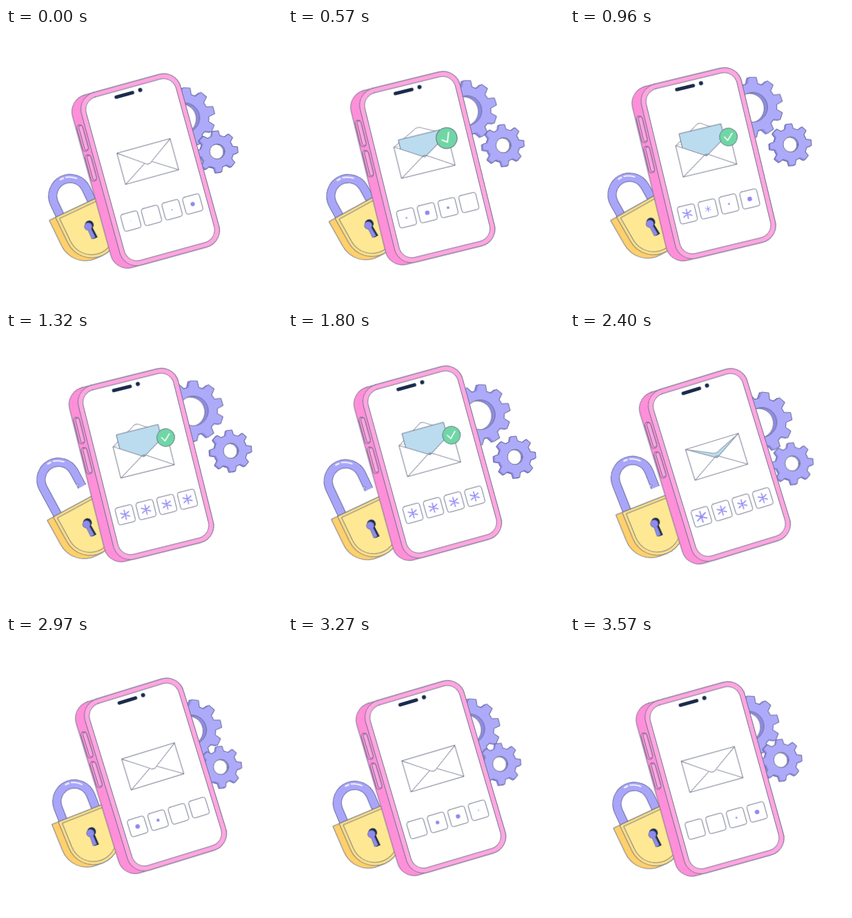
An HTML page without scripts that plays this animation: 400 by 400 pixels, repeating every 3.6 s.

```html
<!DOCTYPE html>
<html lang="en">
<head>
<meta charset="utf-8">
<title>Secure mail</title>
<style>
html, body { margin: 0; width: 100%; height: 100%; overflow: hidden; background: #fff; }
svg { display: block; width: 100vw; height: 100vh; }
.line { stroke: #666d84; stroke-width: .9; stroke-linejoin: round; stroke-linecap: round; }
.loop { animation: 3600ms linear infinite; }

/* Every object drifts on a small circle; some also sway */
.orbit { animation-name: orbit; }
.sway { animation: sway 1800ms cubic-bezier(.37, 0, .63, 1) -900ms infinite alternate; }
@keyframes orbit {
  from { transform: rotate(var(--a)) translateX(var(--r)) rotate(calc(-1 * var(--a))); }
  to { transform: rotate(calc(var(--a) + 360deg)) translateX(var(--r)) rotate(calc(-360deg - var(--a))); }
}
@keyframes sway {
  from { transform: rotate(calc(-1 * var(--s))); }
  to { transform: rotate(var(--s)); }
}

.kick, .shackle, .mail, .letter, .check, .tick, .dot, .star { animation-timing-function: ease-in-out; }
.kick { animation-name: kick; }
@keyframes kick {
  0%, 30.5%, 50%, 76%, 100% { transform: translateY(0); }
  36.5% { transform: translateY(-3px); }
  67% { transform: translateY(-4.5px); }
}
.shackle { animation-name: unlock; }
@keyframes unlock {
  0%, 30.5%, 75%, 100% { transform: translateY(0); }
  35.5% { transform: translateY(-25px); }
  50%, 68.5% { transform: translateY(-22px); }
}

.mail { animation-name: hop; }
@keyframes hop {
  0%, 6%, 28%, 100% { transform: translateY(0); }
  15.8% { transform: translateY(-4px); }
}
.flap-front { animation-name: flap-front; }
@keyframes flap-front {
  0%, 1.7% { transform: scaleY(1); }
  6.1%, 63.9% { transform: scaleY(0); }
  68.2%, 100% { transform: scaleY(1); }
}
.flap-back { animation-name: flap-back; }
@keyframes flap-back {
  0%, 6.1%, 63.9%, 100% { transform: scaleY(0); }
  18%, 59% { transform: scaleY(-.88); }
}
.letter { animation-name: letter; }
@keyframes letter {
  0%, 8.5%, 63.5%, 100% { transform: translateY(0); }
  22%, 54% { transform: translateY(-17px); }
}
.check { animation-name: check; }
@keyframes check {
  0%, 9.5%, 62%, 100% { transform: scale(0); }
  15.8% { transform: scale(1.17); }
  21%, 56% { transform: scale(1); }
}
.tick { animation-name: tick; }
@keyframes tick {
  0%, 9.5% { transform: rotate(-45deg); }
  15.8% { transform: rotate(-25deg); }
  21%, 100% { transform: rotate(0); }
}

.dot { animation-name: pulse; animation-delay: calc(-3600ms + var(--i) * 200ms); }
@keyframes pulse {
  0% { transform: scale(.15); }
  9.4% { transform: scale(1); }
  20.6%, 70% { transform: scale(0); }
  81.5% { transform: scale(1); }
  93.3%, 98.3% { transform: scale(0); }
  100% { transform: scale(.15); }
}
.star { animation-name: star; animation-delay: calc(-3600ms + var(--i) * 90ms); }
@keyframes star {
  0%, 21.7%, 71.1%, 100% { transform: scale(0); }
  26.1%, 64.5% { transform: scale(1); }
  67% { transform: scale(1.18); }
}
</style>
</head>
<body>
<svg viewBox="0 0 400 400" fill="none">
  <defs>
    <path id="big-bar" d="M-5-43H5L7-34V34L5 43H-5L-7 34V-34Z"/>
    <g id="big">
      <circle r="34.5"/>
      <use href="#big-bar"/>
      <use href="#big-bar" transform="rotate(36)"/>
      <use href="#big-bar" transform="rotate(72)"/>
      <use href="#big-bar" transform="rotate(108)"/>
      <use href="#big-bar" transform="rotate(144)"/>
    </g>
    <path id="small-bar" d="M-3.8-29.5H3.8L5.4-22V22L3.8 29.5H-3.8L-5.4 22V-22Z"/>
    <g id="small">
      <circle r="23"/>
      <use href="#small-bar"/>
      <use href="#small-bar" transform="rotate(45)"/>
      <use href="#small-bar" transform="rotate(90)"/>
      <use href="#small-bar" transform="rotate(135)"/>
    </g>
    <clipPath id="big-hole"><circle r="21.5"/></clipPath>
    <clipPath id="small-hole"><circle r="11"/></clipPath>

    <path id="arch" d="M-31.3 0V-50A25.3 25.3 0 0 1 19.3-50V-25"/>
    <path id="key" d="M-2.7 3L-3.2 18.5H3.2L2.7 3A6.3 6.3 0 1 0-2.7 3Z"/>
    <path id="flap" d="M-39.8 0L-6.5 23.5Q0 30.5 6.5 23.5L39.8 0Z"/>
    <rect id="box" x="-12.7" y="-12.7" width="25.4" height="25.4" rx="3.5" class="line"/>
    <circle id="bead" r="3.3" fill="#8f89f2"/>
    <path id="asterisk" d="M0-7V7M-6-3.5L6 3.5M6-3.5L-6 3.5" stroke="#8f89f2" stroke-width="1.5" stroke-linecap="round"/>
  </defs>

  <!-- gears -->
  <g transform="translate(269 125)">
    <g class="loop orbit" style="--a:152deg;--r:11px">
      <g class="sway" style="--s:-3.5deg">
        <g transform="rotate(3)">
          <g fill="#8f8be6" stroke="#4a4f80" stroke-width="1.6" stroke-linejoin="round">
            <use href="#big" x="-3" y="1"/><use href="#big"/>
          </g>
          <use href="#big" x="-3" y="1" fill="#8f8be6"/>
          <use href="#big" fill="#aeaafa"/>
        </g>
      </g>
      <circle r="21.5" fill="#8f8be6"/>
      <g clip-path="url(#big-hole)"><circle cx="-5" cy="1.5" r="21.5" fill="#fff" class="line"/></g>
      <circle r="21.5" class="line"/>
    </g>
  </g>
  <g transform="translate(317.7 180)">
    <g class="loop orbit" style="--a:185deg;--r:11.5px">
      <g transform="rotate(-5)">
        <g fill="#8f8be6" stroke="#4a4f80" stroke-width="1.6" stroke-linejoin="round">
          <use href="#small" x="-2" y="1"/><use href="#small"/>
        </g>
        <use href="#small" x="-2" y="1" fill="#8f8be6"/>
        <use href="#small" fill="#aeaafa"/>
      </g>
      <circle r="11" fill="#8f8be6"/>
      <g clip-path="url(#small-hole)"><circle cx="-2" cy=".6" r="11" fill="#fff" class="line"/></g>
      <circle r="11" class="line"/>
    </g>
  </g>

  <!-- padlock -->
  <g transform="translate(119.7 282.5)">
    <g class="loop orbit" style="--a:90deg;--r:3.6px">
      <g class="loop kick">
        <g class="sway" style="--s:-4.3deg">
          <g transform="rotate(-25.2)">
            <g class="loop shackle">
              <use href="#arch" stroke="#4a4f80" stroke-width="13"/>
              <use href="#arch" stroke="#a9a6f9" stroke-width="11.4"/>
              <path d="M13.6-32l3 2-3 2" fill="#fff" class="line"/>
              <path d="M0-77A28 28 0 0 1 13-69" stroke="#fff" stroke-width="1.8" stroke-linecap="round"/>
              <path d="M-9-77.5H-4" stroke="#fff" stroke-width="1.8" stroke-linecap="round"/>
            </g>
            <path d="M-48-31H38V10A38 38 0 0 1 0 48H-10A38 38 0 0 1-48 10Z" fill="#ffd06c" class="line"/>
            <path d="M-38-31H38V10A38 38 0 0 1-38 10Z" fill="#ffe086" class="line"/>
            <path d="M-33.5-27H33.5V10A33.5 33.5 0 0 1-33.5 10Z" fill="#ffe894" class="line"/>
            <g transform="translate(0 3)">
              <use href="#key" x="1.3" y="-.6" fill="#1b2b4d"/>
              <use href="#key" fill="#8f89f2" class="line" transform="translate(-1.2 .6) scale(.88)"/>
            </g>
          </g>
        </g>
      </g>
    </g>
  </g>

  <!-- phone -->
  <g transform="translate(209 196.9)">
    <g class="loop orbit" style="--a:90deg;--r:8.5px">
      <g class="sway" style="--s:1.9deg">
        <g transform="rotate(-15.4)">
          <rect x="-88" y="-129.8" width="162.5" height="259.6" rx="25" fill="#ff8fd8" class="line"/>
          <g fill="#ff8fd8" class="line">
            <rect x="-86.5" y="-90" width="8.5" height="39.5" rx="4"/>
            <rect x="-86.5" y="-45" width="8.5" height="39.5" rx="4"/>
            <rect x="-83.5" y="-88.5" width="5.5" height="36.5" rx="2.7" fill="#ffa6e0"/>
            <rect x="-83.5" y="-43.5" width="5.5" height="36.5" rx="2.7" fill="#ffa6e0"/>
          </g>
          <rect x="-74.5" y="-129.8" width="149" height="259.6" rx="25" fill="#ffa6e0" class="line"/>
          <rect x="-67.5" y="-122.8" width="135" height="245.6" rx="19" fill="#fff" class="line"/>
          <rect x="-22" y="-117" width="29.5" height="5" rx="2.2" fill="#1b2b4d"/>
          <circle cx="16.7" cy="-115.2" r="3" fill="#1b2b4d"/>

          <g transform="translate(0 -12.3)">
            <g class="loop mail">
              <g transform="translate(0 -23.3)">
                <use href="#flap" class="loop flap-back line" fill="#fff"/>
              </g>
              <rect x="-39.8" y="-23.3" width="79.6" height="46.6" fill="#fff"/>
              <rect x="-31" y="-22" width="62" height="40" fill="#bbdcef" class="loop letter line"/>
              <path d="M-39.8-23.3L0 1.5L39.8-23.3V23.3H-39.8Z" fill="#fff" class="line"/>
              <path d="M-39.8 23.3L-2.5-.5Q0-2 2.5-.5L39.8 23.3" class="line"/>
              <g transform="translate(0 -23.3)">
                <use href="#flap" class="loop flap-front line" fill="#fff"/>
              </g>
              <g transform="translate(37.2 -17.8)">
                <g class="loop check">
                  <circle r="13" fill="#70d6a5" class="line"/>
                  <g transform="rotate(15)">
                    <path d="M-6 0L-1 5L5-5.5" class="loop tick" stroke="#fff" stroke-width="1.6" stroke-linecap="round" stroke-linejoin="round"/>
                  </g>
                </g>
              </g>
            </g>
          </g>

          <g transform="translate(-46.8 64.3)" style="--i:0">
            <use href="#box"/><use href="#bead" class="loop dot"/><use href="#asterisk" class="loop star"/>
          </g>
          <g transform="translate(-15.8 64.3)" style="--i:1">
            <use href="#box"/><use href="#bead" class="loop dot"/><use href="#asterisk" class="loop star"/>
          </g>
          <g transform="translate(15.2 64.3)" style="--i:2">
            <use href="#box"/><use href="#bead" class="loop dot"/><use href="#asterisk" class="loop star"/>
          </g>
          <g transform="translate(46.2 64.3)" style="--i:3">
            <use href="#box"/><use href="#bead" class="loop dot"/><use href="#asterisk" class="loop star"/>
          </g>
        </g>
      </g>
    </g>
  </g>
</svg>
</body>
</html>
```
